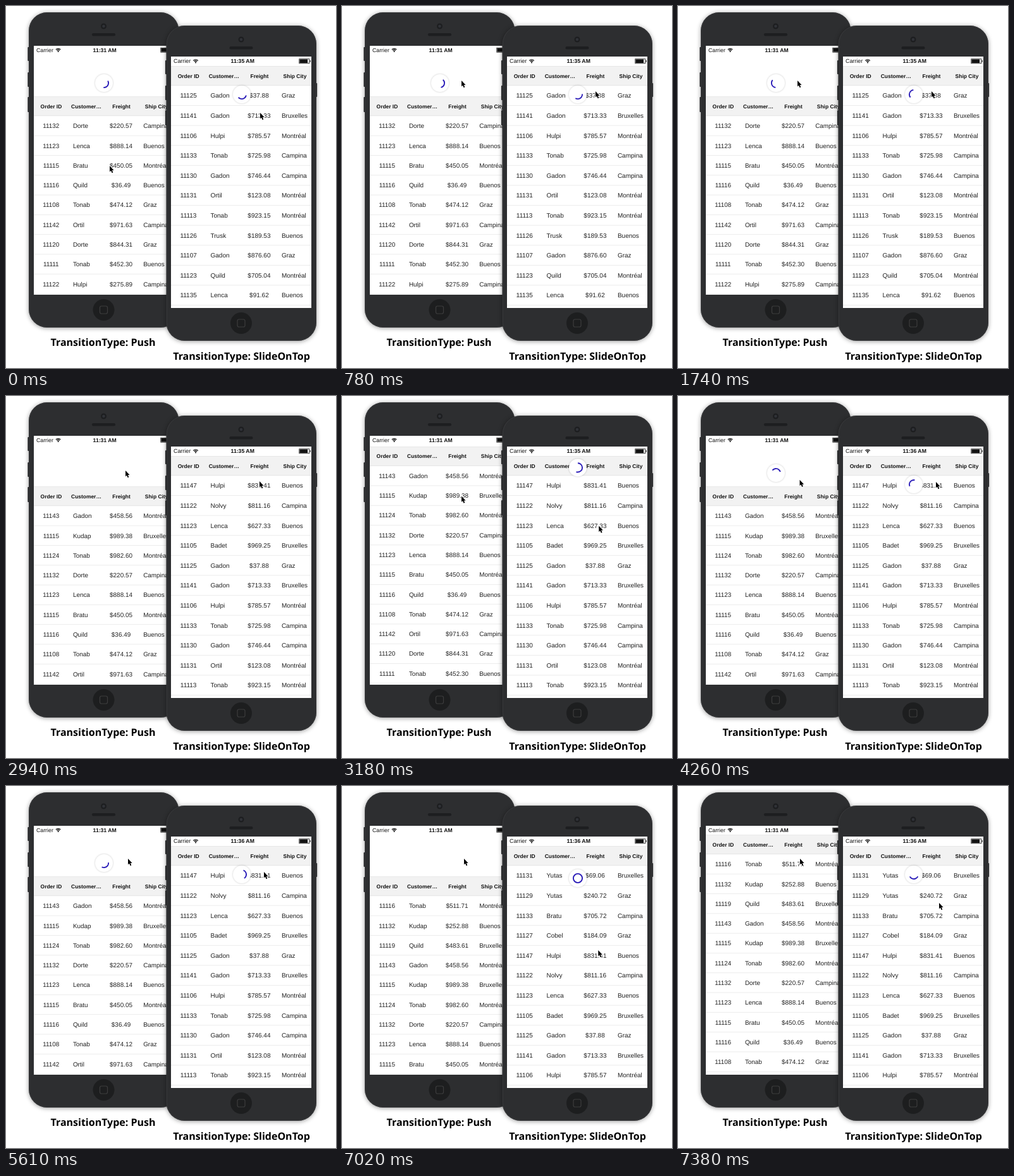
These frames come from a looping animation (522 by 573 pixels, 7.41 s). An HTML page with a canvas:

```html
<!DOCTYPE html>
<html lang="en">
<head>
<meta charset="utf-8">
<title>Pull to refresh transitions</title>
<style>
html, body { margin: 0; width: 100%; height: 100%; overflow: hidden; background: #fff; }
canvas { display: block; }
</style>
</head>
<body>
<canvas id="stage" width="522" height="573"></canvas>
<script>
const ctx = document.getElementById('stage').getContext('2d');
ctx.textRendering = 'geometricPrecision';
const LOOP = 7410, SANS = '"Liberation Sans", Arial, sans-serif';
const CITIES = { B: 'Buenos', C: 'Campina', G: 'Graz', M: 'Montréal', X: 'Bruxelles' };

const parse = text => text.trim().split('\n').map(line => {
  const [id, name, freight, city] = line.trim().split(' ');
  return { id, name, freight: '$' + freight, city: CITIES[city] };
});

const pushRows = parse(`
  11116 Tonab 511.71 M
  11132 Kudap 252.88 B
  11119 Quild 483.61 X
  11143 Gadon 458.56 M
  11115 Kudap 989.38 X
  11124 Tonab 982.60 M
  11132 Dorte 220.57 C
  11123 Lenca 888.14 B
  11115 Bratu 450.05 M
  11116 Quild 36.49 B
  11108 Tonab 474.12 G
  11142 Ortil 971.63 C
  11120 Dorte 844.31 G
  11111 Tonab 452.30 B
  11122 Hulpi 275.89 C`);

const slideRows = parse(`
  11131 Yutas 69.06 X
  11129 Yutas 240.72 G
  11133 Bratu 705.72 C
  11127 Cobel 184.09 G
  11147 Hulpi 831.41 B
  11122 Nolvy 811.16 C
  11123 Lenca 627.33 B
  11105 Badet 969.25 X
  11125 Gadon 37.88 G
  11141 Gadon 713.33 X
  11106 Hulpi 785.57 M
  11133 Tonab 725.98 C
  11130 Gadon 746.44 C
  11131 Ortil 123.08 M
  11113 Tonab 923.15 M
  11126 Trusk 189.53 B
  11107 Gadon 876.60 G
  11123 Quild 705.04 M
  11135 Lenca 91.62 B`);

// Keyframes are [time, value, ...]; values ease between them.
function track(t, keys) {
  const next = keys.findIndex(k => k[0] > t);
  if (next === 0) return keys[0].slice(1);
  if (next < 0) return keys[keys.length - 1].slice(1);
  const a = keys[next - 1], b = keys[next];
  const u = (t - a[0]) / (b[0] - a[0]), e = u * u * (3 - 2 * u);
  return a.slice(1).map((v, i) => v + (b[i + 1] - v) * e);
}

const pushPull = [[2970, 66], [3210, 0], [3330, 0], [3660, 87], [3900, 87], [4140, 66], [7050, 66], [7290, 0]];
const slidePull = [[3060, 0], [3300, 1], [3400, 1], [3490, .91], [6500, .91], [6501, 0], [6780, 0], [6990, 1], [7080, 1], [7170, .91]];
const pushCursor = [[60, 164, 253], [560, 189, 118], [3000, 189, 118], [3300, 189, 180], [3660, 189, 268], [3930, 189, 268], [4350, 193, 115]];
const slideCursor = [[60, 402, 169], [420, 401, 135], [3030, 401, 135], [3300, 410, 255], [3400, 411, 255], [3660, 412, 173],
  [3780, 412, 173], [4200, 408, 136], [6760, 408, 136], [6990, 405, 260], [7080, 406, 260], [7350, 413, 185]];

function rounded(x, y, w, h, r, fill) {
  ctx.beginPath();
  ctx.roundRect(x, y, w, h, r);
  ctx.fillStyle = fill;
  ctx.fill();
}

function disc(x, y, r, fill) {
  ctx.beginPath();
  ctx.arc(x, y, r, 0, 7);
  ctx.fillStyle = fill;
  ctx.fill();
}

function label(text, x, y, font, align = 'left', color = '#222') {
  ctx.font = font;
  ctx.textAlign = align;
  ctx.fillStyle = color;
  ctx.fillText(text, x, y);
}

function phone(x, y) {
  for (const [dy, h] of [[55, 22], [95, 23], [134, 24]]) rounded(x - 1.6, y + dy, 5, h, 1, '#2a2b2d');
  rounded(x + 234, y + 91, 4.6, 22, 1, '#2a2b2d');
  ctx.save();
  ctx.shadowColor = 'rgba(0,0,0,.4)';
  ctx.shadowBlur = 7;
  ctx.shadowOffsetY = 1;
  rounded(x, y, 237.5, 499, 29, '#2d2e30');
  ctx.restore();
  ctx.strokeStyle = '#38393b';
  ctx.lineWidth = 1;
  ctx.beginPath();
  ctx.roundRect(x + .8, y + .8, 236, 497.4, 28);
  ctx.stroke();
  const cx = x + 118.5;
  disc(cx, y + 22, 4.5, '#1d1e20');
  disc(cx, y + 22, 2.3, '#303237');
  rounded(cx - 18.5, y + 33, 37, 4.5, 2.2, '#1d1e20');
  disc(cx, y + 471, 17, '#1d1e1f');
  ctx.strokeStyle = '#3c3c3d';
  ctx.lineWidth = 1.2;
  ctx.beginPath();
  ctx.roundRect(cx - 6, y + 465, 12, 12, 2.5);
  ctx.stroke();
}

function statusBar(clock) {
  label('Carrier', 4, 10.4, '8.9px ' + SANS, 'left', '#111');
  label(clock, 113.2, 10.4, 'bold 8.7px ' + SANS, 'center', '#111');
  ctx.strokeStyle = '#111';
  ctx.lineWidth = 1.4;
  for (const r of [3.1, 5.3]) {
    ctx.beginPath();
    ctx.arc(39, 10.2, r, -Math.PI * .75, -Math.PI * .25);
    ctx.stroke();
  }
  disc(39, 9.5, 1.1, '#111');
  ctx.lineWidth = .8;
  ctx.strokeRect(202.8, 3.8, 16, 7);
  ctx.fillStyle = '#111';
  ctx.fillRect(203.4, 4.4, 12.8, 5.8);
  ctx.fillRect(219.6, 5.9, 1.2, 2.8);
}

function grid(rows, top) {
  ctx.fillStyle = '#f2f2f2';
  ctx.fillRect(0, top, 222, 31);
  ctx.fillStyle = '#e2e2e2';
  ctx.fillRect(0, top, 222, .7);
  ctx.fillRect(0, top + 30.3, 222, .8);
  ['Order ID', 'Customer…', 'Freight', 'Ship City'].forEach((title, i) =>
    label(title, 27.7 + 56.1 * i, top + 18.5, 'bold 8.5px ' + SANS, 'center', '#111'));
  const font = '10px ' + SANS;
  rows.forEach((row, i) => {
    const y = top + 31 + i * 31.6;
    label(row.id, 27.6, y + 19.4, font, 'center');
    label(row.name, 62.5, y + 19.4, font);
    label(row.freight, 139.4, y + 19.4, font, 'center');
    label(row.city, 174.9, y + 19.4, font);
    ctx.fillStyle = '#eaeaea';
    ctx.fillRect(0, y + 31.1, 222, .9);
  });
}

// Runs draw() inside a clipped area.
function clipped(x, y, w, h, draw) {
  ctx.save();
  ctx.beginPath();
  ctx.rect(x, y, w, h);
  ctx.clip();
  draw();
  ctx.restore();
}

function screen(x, y, top, h, scale, clock, rows, gridTop) {
  clipped(x, top, 222, h, () => {
    ctx.fillStyle = '#fff';
    ctx.fillRect(x, top, 222, h);
    ctx.translate(x, y);
    ctx.scale(scale, scale);
    statusBar(clock);
    grid(rows, gridTop);
  });
}

function spinner(x, y, from, sweep) {
  ctx.save();
  ctx.shadowColor = 'rgba(0,0,0,.22)';
  ctx.shadowBlur = 3;
  disc(x, y, 14, '#fff');
  ctx.restore();
  ctx.strokeStyle = '#2a1cb8';
  ctx.lineWidth = 1.9;
  ctx.beginPath();
  ctx.arc(x, y, 7.1, from * Math.PI / 180, (from + sweep) * Math.PI / 180);
  ctx.stroke();
}

const spinning = (x, y, mid) => spinner(x, y, mid - 63, 126);
const pulling = (x, y, progress) => spinner(x, y, -90, 360 * Math.min(1, progress));
const turn = (t, at, angle) => angle + (t - at) * .9;

function pushSpinner(t, pull) {
  const x = 155, y = 122 + (pull - 66) * 24 / 21;
  if (t < 2650) spinning(x, y, turn(t, 0, 32));
  else if (t >= 3330 && t < 3900) pulling(x, y, pull / 72);
  else if (t >= 3900 && t < 6600) spinning(x, y, turn(t, 5610, 55));
}

function slideSpinner(t, pull) {
  const x = 373, y = 80 + pull * 66;
  if (t < 2600) spinning(x, 140, turn(t, 0, 75));
  else if ((t >= 3060 && t < 3400) || (t >= 6780 && t < 7080)) pulling(x, y, pull * 1.1);
  else if (t >= 3400 && t < 6500) spinning(x, y, turn(t, 3690, 65));
  else if (t >= 7080) spinning(x, y, turn(t, 7380, 88));
}

function cursor([x, y]) {
  ctx.save();
  ctx.translate(x, y);
  ctx.beginPath();
  for (const [px, py] of [[0, 0], [0, 9.4], [2, 7.6], [3.6, 11.2], [5.3, 10.4], [3.8, 7], [6.6, 7]]) ctx.lineTo(px, py);
  ctx.closePath();
  ctx.lineJoin = 'round';
  ctx.strokeStyle = '#fff';
  ctx.lineWidth = 1.6;
  ctx.stroke();
  ctx.fillStyle = '#000';
  ctx.fill();
  ctx.restore();
}

function draw(t) {
  ctx.fillStyle = '#fff';
  ctx.fillRect(0, 0, 522, 573);

  const [pull] = track(t, pushPull), [slide] = track(t, slidePull);
  const pushFirst = t < 2650 ? 6 : t < 6600 ? 3 : 0;
  const slideFirst = t < 2600 ? 8 : t < 6500 ? 4 : 0;

  phone(36, 10);
  screen(44, 62.5, 63, 394, .99, '11:31 AM', pushRows.slice(pushFirst), 15 + pull / .99);
  clipped(44, 77, 222, 380, () => pushSpinner(t, pull));
  cursor(track(t, pushCursor));

  phone(253.5, 31);
  screen(261, 80, 80, 398, 1, t < 4200 ? '11:35 AM' : '11:36 AM', slideRows.slice(slideFirst), 15);
  clipped(261, 95, 222, 383, () => slideSpinner(t, slide));
  cursor(track(t, slideCursor));

  const caption = 'bold 16px "Open Sans", "Noto Sans", sans-serif';
  label('TransitionType: Push', 153.5, 538, caption, 'center', '#000');
  label('TransitionType: SlideOnTop', 372.5, 560, caption, 'center', '#000');
}

const start = performance.now();
function frame() {
  draw((performance.now() - start) % LOOP);
  requestAnimationFrame(frame);
}
frame();
</script>
</body>
</html>
```
